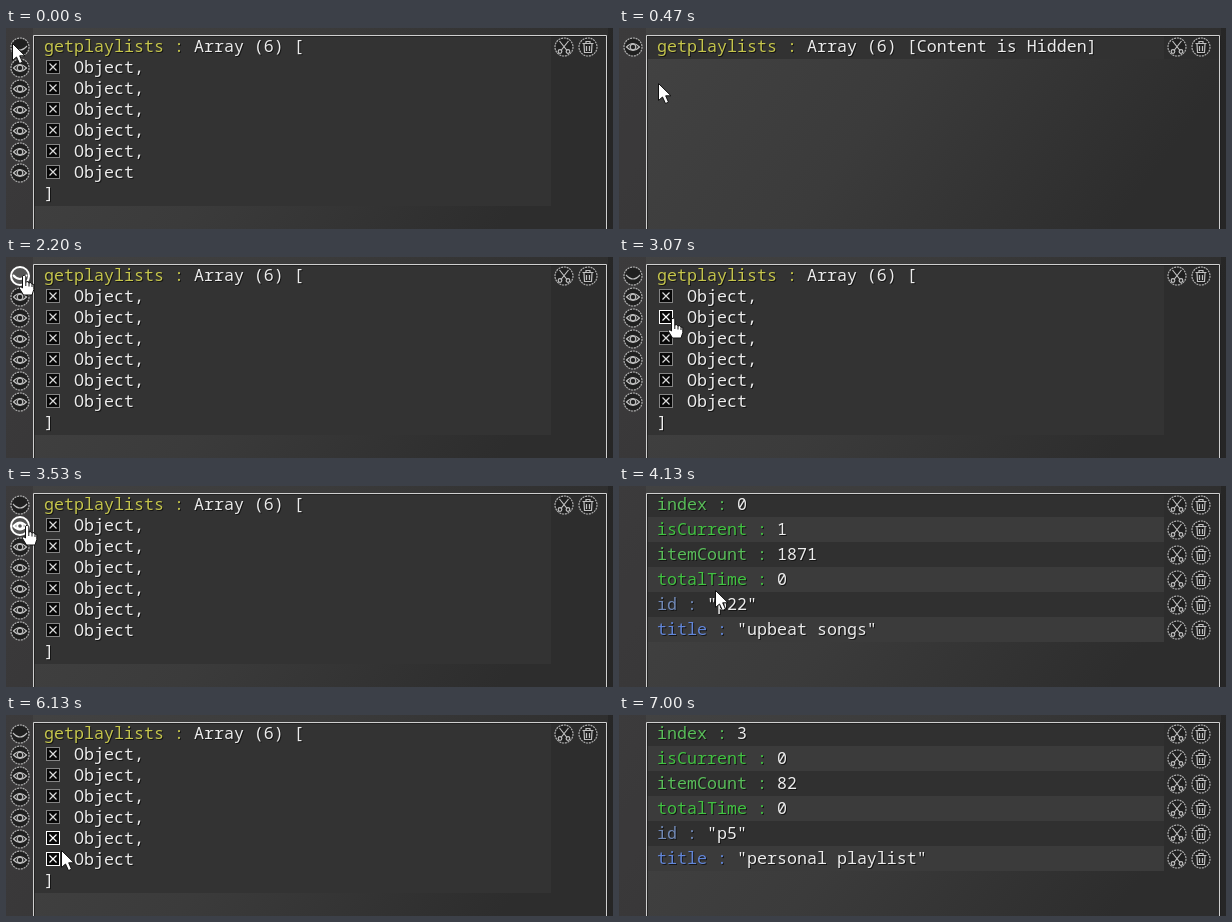
These frames come from a looping animation (607 px wide and 201 px high, 8.14 s). An HTML page:

```html
<!DOCTYPE html>
<html lang="en">
<head>
<meta charset="utf-8">
<title>Playlist inspector</title>
<style>
html, body { margin: 0; width: 100%; height: 100%; overflow: hidden; background: #393939; }
svg { display: block; }
text { font: 16.67px "Noto Sans Mono", "DejaVu Sans Mono", monospace; white-space: pre; fill: #ececec; filter: drop-shadow(1px 1px 0 #151515); }
.icon { fill: none; stroke: #c0c0c0; stroke-width: 1.2; }
.icon .disc { fill: #202020; stroke: #b0b0b0; stroke-dasharray: 2 .8; }
.icon .dot { fill: #d8d8d8; stroke: none; }
.icon.lit { stroke: #fff; stroke-width: 2; }
.lit .disc { stroke: #fff; stroke-width: 2; stroke-dasharray: none; fill: #555; }
.box { fill: #080808; stroke: #858585; }
.box path { stroke: #dcdcdc; stroke-width: 1.2; }
.box.lit, .box.lit path { stroke: #fff; }
.cursor { fill: #fff; stroke: #111; stroke-width: 1; stroke-linejoin: round; }
</style>
</head>
<body>
<svg id="stage" width="607" height="201" viewBox="0 0 607 201">
  <defs>
    <linearGradient id="bg" x2="1" y2=".25">
      <stop offset="0" stop-color="#434343"/>
      <stop offset=".5" stop-color="#3b3b3b"/>
      <stop offset="1" stop-color="#2d2d2d"/>
    </linearGradient>
    <g id="eye">
      <path d="M-6.5 0Q0-7 6.5 0Q0 7-6.5 0Z"/><circle class="dot" r="2.8"/>
    </g>
    <path id="lid" d="M-7-1Q0 7 7-1"/>
    <g id="cut">
      <path d="M-4.5-6L3 3.5M4.5-6L-3 3.5"/><circle cx="-4" cy="4.5" r="1.8"/><circle cx="4" cy="4.5" r="1.8"/>
    </g>
    <path id="bin" d="M-5.5-3.5H5.5M-2-3.5V-5.5H2V-3.5M-4-3L-3.5 5.5H3.5L4-3M-1.5-1V4M1.5-1V4"/>
    <path id="frame" d="M27.5 201V7.5H600.5V201" fill="none"/>
  </defs>
  <rect width="607" height="201" fill="url(#bg)"/>
  <rect width="27" height="201" fill="#302c2e" opacity=".35"/>
  <rect x="602" width="5" height="201" fill="#222" opacity=".6"/>
  <g id="views"></g>
  <use href="#frame" x="1" y="1" stroke="#1c1c1c" opacity=".7"/>
  <use href="#frame" stroke="#cfcfcf"/>
  <g id="cursor" class="cursor">
    <path id="arrow" d="M.5.5V17.5L4.5 14L7.5 20.5L10.5 19.2L7.7 12.8H13Z"/>
    <g id="hand">
      <path d="M-1.5 11V1.2Q0-1.2 1.8 1.2V7L4 6.6L5 8L7 7.6L8 9L9.8 9.5V14.5L8 20H-.5L-4.5 13.5Q-4.5 10.5-1.5 13Z"/>
      <path d="M1.8 7V11M5 8V11.5M8 9V12" fill="none"/>
    </g>
  </g>
</svg>
<script>
const LOOP = 8140, TICK = 1000 / 15;
const $ = id => document.getElementById(id);

const rect = (x, y, w, h, fill) => `<rect x="${x}" y="${y}" width="${w}" height="${h}" fill="${fill}"/>`;
const text = (x, y, key, color, value = '') =>
  `<text x="${x}" y="${y}"><tspan fill="${color}">${key}</tspan>${value}</text>`;
const icon = (name, x, y, hot = '') =>
  `<g class="icon" transform="translate(${x} ${y})" ${hot && `data-hot="${x},${y}"`}><circle class="disc" r="9"/><use href="#${name}"/></g>`;
const box = y =>
  `<g class="box" data-hot="47,${y}"><rect x="40.5" y="${y - 6.5}" width="13" height="13"/><path d="M43.5 ${y - 3.5}l7 7m0-7l-7 7"/></g>`;
const tools = y => icon('cut', 558, y) + icon('bin', 582, y);
const band = (y, h, fill) => rect(28, y, 517, h, fill) + rect(545, y, 55, h, '#2d2d2d');
const header = tail => text(38, 24, 'getplaylists : ', '#c6c64c', 'Array (6) [' + tail) + tools(19);

function listView() {
  let out = band(8, 170, '#333') + header('') + icon('lid', 14, 19, 'hot');
  for (let i = 1; i <= 6; i++) {
    const y = 18 + 21 * i;
    out += icon('eye', 14, y + 1, 'hot') + box(y) + text(68, y + 6, 'Object' + (i < 6 ? ',' : ''), '#ececec');
  }
  return out + text(38, 171, ']', '#ececec');
}

const hiddenView = () => band(8, 23, '#323232') + header('Content is Hidden]') + icon('eye', 14, 19, 'hot');

const KEYS = ['index', 'isCurrent', 'itemCount', 'totalTime', 'id', 'title'];
const COLORS = ['#59bd59', '#42c242', '#59bd59', '#42c242', '#7088b5', '#6286d8'];
function itemView(...values) {
  return KEYS.map((key, i) => {
    const y = 6 + 25 * i;
    return band(Math.max(y, 8), i ? 25 : 23, i % 2 ? '#3b3b3b' : '#303030') +
      text(38, y + 18, key + ' : ', COLORS[i], values[i]) + tools(y + 13);
  }).join('');
}

const views = [
  listView(), hiddenView(),
  itemView(0, 1, 1871, 0, '"p22"', '"upbeat songs"'),
  itemView(3, 0, 82, 0, '"p5"', '"personal playlist"')
].map(html => {
  const g = document.createElementNS('http://www.w3.org/2000/svg', 'g');
  g.innerHTML = html;
  $('views').append(g);
  const hot = [...g.querySelectorAll('[data-hot]')].map(el => ({ el, at: el.dataset.hot.split(',').map(Number) }));
  return { g, hot };
});

// [tick, view]
const SCENES = [[0, 0], [4, 1], [33, 0], [56, 2], [84, 0], [100, 3]];
// [tick, x, y] of the pointer tip
const PATH = [
  [0, 6, 15], [2, 16, 20], [4, 16, 20], [11, 74, 109], [13, 75, 108], [18, 75, 108],
  [19, 75, 107], [30, 18, 18], [33, 18, 18], [40, 97, 66], [43, 97, 66],
  [46, 54, 61], [53, 21, 39], [57, 21, 39], [62, 96, 104], [73, 96, 104],
  [76, 96, 109], [88, 96, 109], [90, 84, 161], [91, 53, 148], [92, 55, 135],
  [93, 51, 124], [97, 19, 102], [101, 19, 102], [104, 76, 178]
];

function tipAt(k) {
  const i = PATH.findIndex(p => p[0] > k);
  if (i < 0) return PATH[PATH.length - 1].slice(1);
  if (i === 0) return PATH[0].slice(1);
  const [a, ax, ay] = PATH[i - 1], [b, bx, by] = PATH[i];
  const u = (k - a) / (b - a), e = u * u * (3 - 2 * u);
  return [Math.round(ax + (bx - ax) * e), Math.round(ay + (by - ay) * e)];
}

const over = ([x, y], [hx, hy]) => Math.abs(x - hx) < 8 && Math.abs(y - hy) < 8;

function draw(t) {
  const k = Math.floor((t + 4) / TICK);
  const scene = SCENES.filter(s => s[0] <= k).pop()[1];
  views.forEach(({ g }, i) => g.style.display = i === scene ? '' : 'none');

  const tip = tipAt(k), { hot } = views[scene];
  // highlights lead the pointer by a tick and linger behind it
  const trail = [k - 1, k, k + 1].map(tipAt);
  hot.forEach(({ el, at }) => el.classList.toggle('lit', k > 0 && trail.some(p => over(p, at))));

  const hand = hot.some(({ at }) => over(tip, at));
  $('arrow').style.display = hand ? 'none' : '';
  $('hand').style.display = hand ? '' : 'none';
  $('cursor').style.display = k < 105 ? '' : 'none';
  $('cursor').setAttribute('transform', `translate(${tip})`);
}

const start = performance.now();
function frame() {
  draw((performance.now() - start) % LOOP);
  requestAnimationFrame(frame);
}
frame();
</script>
</body>
</html>
```
